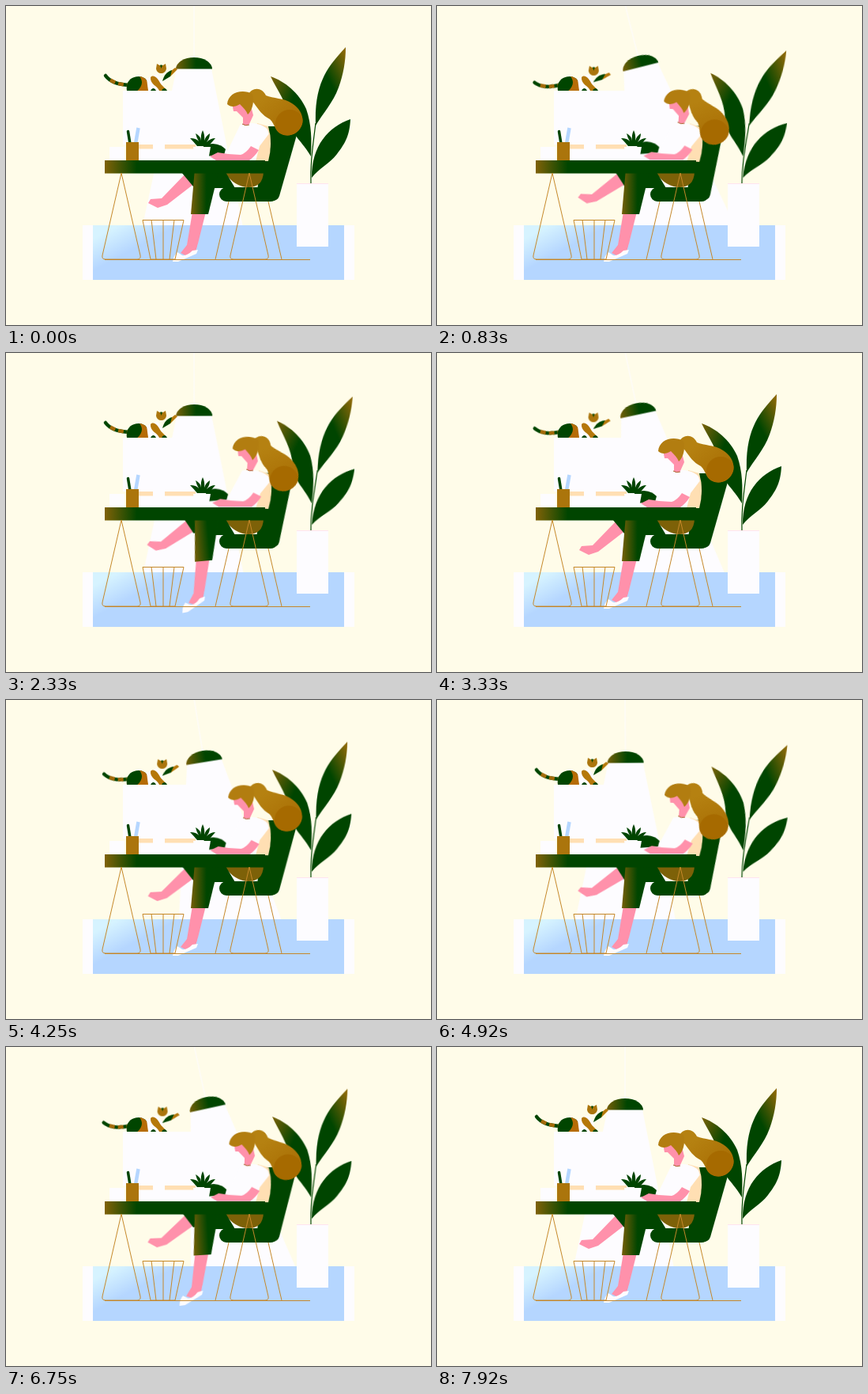
Write an HTML page that moves like this. It is 538x403 px and loops after 8.01 s.

```html
<!DOCTYPE html>
<html lang="en">
<head>
<meta charset="utf-8">
<title>Working at a desk</title>
<style>
  html, body { margin: 0; width: 100%; height: 100%; overflow: hidden; background: #fffce9; }
  svg { display: block; width: 100%; height: 100%; }

  .green { fill: #004500; }
  .pink { fill: #ff91ab; }
  .white { fill: #fdfcff; }
  .beige { fill: #ffdfb3; }
  .gold { fill: #ab750c; }
  .wire { fill: none; stroke: #c5882a; stroke-width: 1; stroke-linejoin: round; }

  /* 8010 ms loop: two sways of the room, three swings of the lamp */
  .sway, .lean, .step { animation: 4005ms infinite; }
  .swing { animation: swing 2670ms infinite; }
  .sway { animation-name: sway; }
  .lean { animation-name: lean; }
  .step { animation-name: step; }
  .sway, .lean, .swing { animation-timing-function: cubic-bezier(.3, .1, .5, 1); }
  .step { animation-timing-function: ease-in-out; }

  @keyframes sway {
    0%, 80%, 100% { transform: none; }
    42% { transform: var(--to); }
  }
  @keyframes lean {
    0%, 84%, 100% { transform: none; }
    40%, 46% { transform: var(--to); }
  }
  @keyframes swing {
    0%, 92%, 100% { transform: none; }
    42% { transform: var(--to); }
  }
  @keyframes step {
    0%, 23%, 83%, 100% { transform: none; }
    44%, 60% { transform: var(--to); }
  }

  #plant { --to: rotate(3.8deg); transform-origin: 386px 224px; }
  .leaf { --to: rotate(4.6deg); }
  #leafTop { transform-origin: 392px 151px; }
  #leafLeft { transform-origin: 386px 190px; }
  #leafLow { transform-origin: 387px 217px; }
  #lamp { --to: rotate(-15.5deg); transform-origin: 238px -2px; }
  #tail { --to: rotate(-18deg); transform-origin: 155px 101px; }
  #catHead { --to: translate(2px, 3px); }
  #paw { --to: translate(0, 2px) rotate(17deg); transform-origin: 200px 94px; }
  #back { --to: rotate(-6.5deg); transform-origin: 330px 242px; }
  #torso { --to: rotate(3.5deg); transform-origin: 308px 200px; }
  #head { --to: translate(5px, -3px) rotate(2deg); transform-origin: 305px 148px; }
  #hair { --to: rotate(24deg); transform-origin: 312px 112px; }
  #arm { --to: translate(5px, -1px); }
  #knee { --to: translate(5px, -4px); }
  #shin { --to: translate(3px, 0) rotate(10deg); transform-origin: 238px 215px; }
  #leg { --to: rotate(-5deg); transform-origin: 245px 205px; }
  #shoe { --to: rotate(-6deg); transform-origin: 241px 308px; }
</style>
</head>
<body>
<svg viewBox="0 0 538 403" preserveAspectRatio="none">
  <defs>
    <linearGradient id="rugTone" gradientUnits="userSpaceOnUse" x1="110" y1="277" x2="134" y2="322">
      <stop offset=".3" stop-color="#d6f3ff"/><stop offset="1" stop-color="#b5d6ff"/>
    </linearGradient>
    <linearGradient id="leafTone" x1=".9" y1="0" x2=".35" y2=".75">
      <stop offset="0" stop-color="#8b6808"/><stop offset=".65" stop-color="#004500"/>
    </linearGradient>
    <linearGradient id="leafTone2" x1="0" y1="0" x2=".7" y2=".6">
      <stop offset="0" stop-color="#7d6208"/><stop offset=".65" stop-color="#004500"/>
    </linearGradient>
    <linearGradient id="sideTone">
      <stop offset="0" stop-color="#755f08"/><stop offset=".55" stop-color="#004500"/>
    </linearGradient>
    <linearGradient id="deskTone">
      <stop offset="0" stop-color="#806208"/><stop offset=".2" stop-color="#004500"/>
    </linearGradient>
    <linearGradient id="hairTone" x1="0" y1="0" x2="1" y2="1">
      <stop offset=".25" stop-color="#b58111"/><stop offset="1" stop-color="#a46800"/>
    </linearGradient>
    <clipPath id="hairClip">
      <path id="hairShape" d="M306 113C311 102 324 102 329 113C338 117 352 116 362 123C373 130 377 140 375 149C371 162 357 167 347 161C340 157 341 150 334 143C324 138 320 131 314 123Z"/>
    </clipPath>
    <clipPath id="catClip"><path d="M153 107C151 95 159 89 168 89C177 89 182 97 181 107Z"/></clipPath>
  </defs>

  <rect width="538" height="403" fill="#fffce9"/>

  <g id="lamp" class="swing">
    <path d="M238 0V66" stroke="#fdfcff" stroke-width="1"/>
    <path class="white" d="M216 79H260L304 300H168Z"/>
    <path d="M215 79.500A23 14.500 0 0 1 261 79.500Z" fill="url(#sideTone)"/>
  </g>

  <rect class="white" x="97" y="277" width="344" height="69"/>
  <rect x="110" y="277" width="318" height="69" fill="url(#rugTone)"/>

  <g id="plant" class="sway">
    <path d="M386 226C385 200 388 180 392 148" fill="none" stroke="#004500" stroke-width="1.2"/>
    <path id="leafTop" class="leaf sway" d="M430 52C408 76 390 96 392 151C401 136 414 122 421 103C427 86 430 70 430 52Z" fill="url(#leafTone)"/>
    <path id="leafLeft" class="leaf sway" d="M335 89C353 95 371 110 380 130C387 150 387 170 386 190C376 172 362 164 359 145C356 122 344 108 335 89Z" fill="url(#leafTone2)"/>
    <path id="leafLow" class="leaf sway green" d="M436 143C408 153 387 176 387 217C397 204 409 200 419 187C429 174 435 164 436 143Z"/>
  </g>
  <rect class="white" x="368" y="224" width="40" height="80"/>
  <path d="M368 224.500H408" stroke="#ffe4ef"/>

  <rect class="white" x="148" y="107" width="96" height="68"/>
  <rect class="white" x="168" y="174" width="90" height="21"/>

  <g id="cat">
    <g id="tail" class="swing" fill="none" stroke-width="4.500">
      <path d="M126 88C132 96 141 99 156 100" stroke="#004500" stroke-linecap="round"/>
      <path d="M132 93.500C138 97 144 99 154 100" stroke="#a56a08" stroke-dasharray="7 4"/>
    </g>
    <g clip-path="url(#catClip)">
      <rect class="green" x="150" y="86" width="34" height="22"/>
      <path d="M168 88C175 95 172 103 165 108H184V88Z" fill="#b66c05"/>
    </g>
    <path class="white" d="M178 92L191 86L199 96L196 107H180Z"/>
    <path d="M183 90C187 86 192 91 195 97C197 101 201 102 203 107H194C192 101 182 99 183 90Z" fill="#b5780a"/>
    <path class="green" d="M183 107C185 103 188 103 190 107ZM197 107C199 103 202 103 204 107Z"/>
    <g id="paw" class="swing">
      <path d="M204 86L214 78L217 80L208 89Z" fill="#b5780a"/>
      <path class="green" d="M198 95C200 87 204 83 210 81L208 89Z"/>
    </g>
    <g id="catHead" class="swing">
      <path class="gold" d="M191 73L194.500 75H198.500L202 73L203 79C202 87 191 87 190 79Z"/>
      <path class="green" d="M195 74.500H198L196.500 79Z"/>
    </g>
  </g>

  <rect class="beige" x="168" y="175" width="72" height="5.500"/>
  <rect class="white" x="186" y="174" width="15" height="21"/>
  <rect class="white" x="131" y="178" width="19" height="17"/>
  <path d="M154.500 158.500L157 174" stroke="#004500" stroke-width="3.500" stroke-linecap="round"/>
  <path d="M167.500 154L164 174" stroke="#b5d6ff" stroke-width="4.500"/>
  <rect class="gold" x="152" y="172" width="16" height="23"/>

  <g id="back" class="lean">
    <path class="green" d="M330 152H368Q371 152 370 156L346 240Q344 246 337 246H316Z"/>
  </g>
  <path class="green" d="M279 229H346L342 243Q340 247 335 247H279A9 9 0 0 1 279 229Z"/>

  <g id="knee" class="lean">
    <path class="green" d="M250 175L262 174Q273 175 278 181L276 188L250 190Z"/>
  </g>

  <g id="torso" class="lean">
    <path class="beige" d="M318 148L332 152Q338 174 332 196H310Z"/>
    <path class="white" d="M297 149C308 146 325 148 331 156Q337 170 322 181L316 196H290L280 184Z"/>
    <path class="beige" d="M321 177L334 160Q336 178 331 196H316Z"/>
    <g id="head" class="lean">
      <path class="pink" d="M286 122L288 133L292 133L300 141L300 149Q304 152 308 149L313 138L309 122Z"/>
      <path d="M299 149Q303 152 308 150" fill="none" stroke="#a85b25"/>
      <g id="hair" class="lean">
        <use href="#hairShape" fill="url(#hairTone)"/>
        <circle cx="359" cy="149" r="18" fill="#a66a00" clip-path="url(#hairClip)"/>
      </g>
      <path d="M280 124C281 109 299 104 312 111C315 122 311 133 306 137C304 132 301 129 296 124C290 128 284 128 280 124Z" fill="#b27d10"/>
    </g>
  </g>

  <path class="white" d="M237 178H259L256 195H239Z"/>
  <path class="green" d="M242 177Q237 171 233 167Q241 167 244 171Q241 166 240 161Q246 164 247 170Q246 163 249 157Q252 163 251 170Q253 164 258 161Q258 167 254 172Q259 167 265 167Q260 173 256 177Z"/>
  <g id="arm" class="lean">
    <path class="pink" d="M258 190L268 185L281 187L297 188Q304 186 310 177L320 182Q315 190 308 195H266Z"/>
  </g>

  <path d="M276 210H326Q325 229 307 229Q290 229 276 210Z" fill="#7d6108"/>
  <g id="shin" class="lean">
    <path class="pink" d="M228 211L239 224L204 251L192 255L180 249L183 244L197 243Z"/>
    <path class="green" d="M222 210H248V224L237 228Z"/>
  </g>
  <path class="green" d="M241 210H278L290 230H263L241 236Z"/>
  <g id="leg" class="step">
    <path class="pink" d="M236 260H253L243 300L240 309L228 311L229 302Z"/>
    <g id="shoe" class="step">
      <path class="pink" d="M229 302L242 303L240 310L229 316L221 312Z"/>
      <path class="white" d="M211 323Q212 315 217 311L223 315Q229 316 236 309L243 308L241 313L218 323Z"/>
    </g>
    <path d="M239 206H270L256 263H234Z" fill="url(#sideTone)"/>
  </g>
  <rect x="125" y="195" width="203" height="16.500" fill="url(#deskTone)"/>

  <g class="wire">
    <path d="M125 320.500H385"/>
    <path id="trestle" d="M146 211L122 315Q121 320 126 320H166Q171 320 170 315Z"/>
    <use href="#trestle" x="162"/>
    <path d="M282 247L265 320M332 247L349 320"/>
    <path d="M173 270.500H225L214 320H183ZM184 270L190 320M199 270V320M213 270L207 320"/>
  </g>
</svg>
</body>
</html>
```
